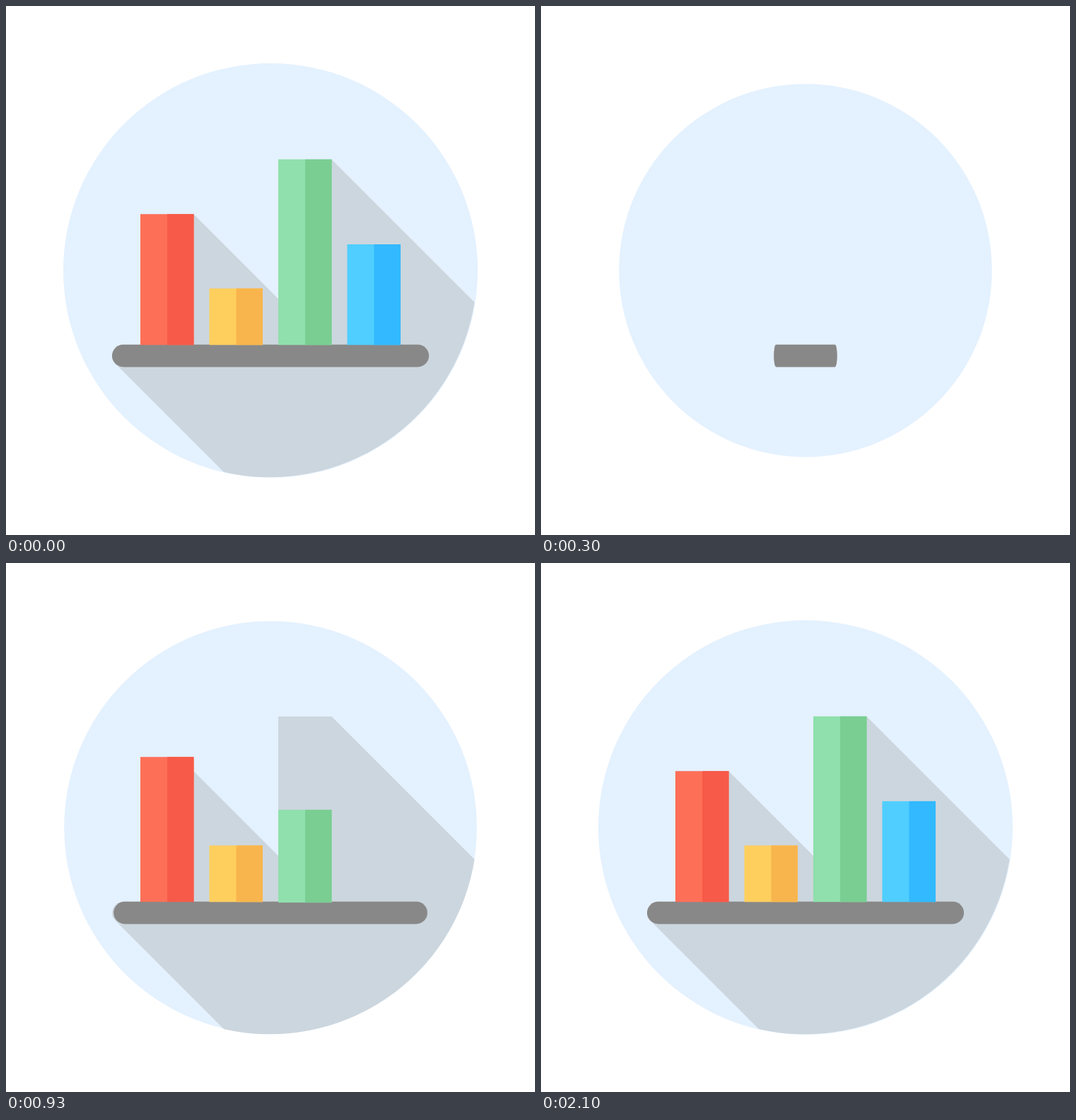
These frames come from a looping animation (748 px wide and 748 px high, 3.63 s). An HTML page:

```html
<!DOCTYPE html>
<html lang="en">
<head>
<meta charset="utf-8">
<title>Bar chart</title>
<style>
  html, body { margin: 0; width: 100%; height: 100%; overflow: hidden; background: #fff; }
  svg { display: block; width: 100%; height: 100%; }
</style>
</head>
<body>
<svg viewBox="0 0 748 748">
  <circle id="disc" cx="374" cy="374" r="293" fill="#e4f1fe"/>
  <path id="shadow" fill="#ccd6de" d="M154.5 505.5A15.75 15.75 0 0 1 165.5 479H190V294.5H265.5L385 414V217H460.5L662.5 419A293 293 0 0 1 308 659Z"/>
  <rect id="shelf" x="150" y="478.8" width="448" height="31.6" rx="15.8" fill="#888"/>
  <g id="bars"></g>
</svg>
<script>
const LOOP = 3630, STEP = 30, GROW = 300, FADE_START = 510;
const BASE = 481, BOTTOM = 479.3, BAR_WIDTH = 75.5;

const byId = id => document.getElementById(id);
const disc = byId('disc'), shadow = byId('shadow'), shelf = byId('shelf');

const bars = [
  { x: 190, top: 294.3, start: 480, colors: ['#fe6f58', '#f75a48'] },
  { x: 287.5, top: 399.4, start: 630, colors: ['#fecf5d', '#f8b54d'] },
  { x: 385, top: 216.8, start: 780, colors: ['#8fe0ac', '#7ace92'] },
  { x: 482.5, top: 337, start: 930, colors: ['#4fceff', '#32b9ff'] }
];

function addRect(parent, attributes) {
  const rect = document.createElementNS('http://www.w3.org/2000/svg', 'rect');
  for (const name in attributes) rect.setAttribute(name, attributes[name]);
  parent.appendChild(rect);
}

for (const bar of bars) {
  bar.node = document.createElementNS('http://www.w3.org/2000/svg', 'g');
  const box = { x: bar.x, y: bar.top, width: BAR_WIDTH, height: BOTTOM - bar.top };
  addRect(bar.node, { ...box, fill: bar.colors[0] });
  addRect(bar.node, { ...box, x: bar.x + 38, width: BAR_WIDTH - 38, fill: bar.colors[1] });
  byId('bars').appendChild(bar.node);
}

// Linear growth, then a damped oscillation around full size.
function grow(time, start) {
  const t = time - start;
  if (t <= 0) return 0;
  if (t < GROW) return t / GROW;
  const s = (t - GROW) / 1000;
  return 1 + 0.29 * Math.sin(2 * Math.PI * 1.46 * s) * Math.exp(-6.5 * s);
}

function setScale(node, cx, cy, sx, sy) {
  node.style.display = sx && sy ? '' : 'none';
  node.setAttribute('transform', `translate(${cx} ${cy}) scale(${sx} ${sy}) translate(${-cx} ${-cy})`);
}

function draw() {
  const step = Math.floor((performance.now() + 2) % LOOP / STEP) * STEP;
  const time = step || LOOP; // the loop opens on the finished chart
  const discScale = grow(time, 30);
  setScale(disc, 374, 374, discScale, discScale);
  setScale(shelf, 374, 494.6, grow(time, 240), 1);
  for (const bar of bars) setScale(bar.node, bar.x, BASE, 1, grow(time, bar.start));
  shadow.setAttribute('opacity', Math.min(1, Math.max(0, (time - FADE_START) / GROW)));
  requestAnimationFrame(draw);
}
draw();
</script>
</body>
</html>
```
